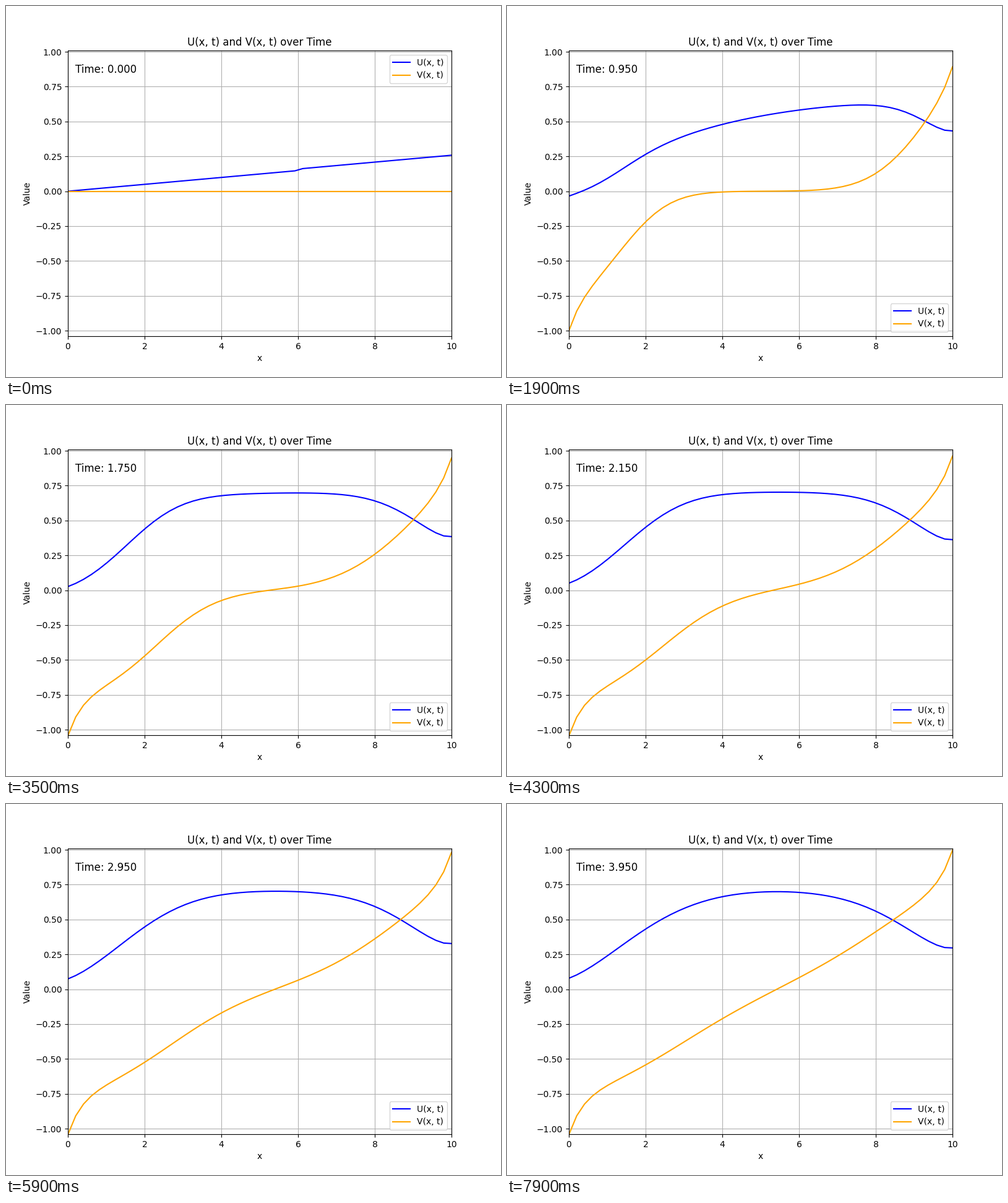
These frames come from a looping animation (800x600 px, 8 s). A matplotlib script:

```python
import matplotlib.pyplot as plt
import numpy as np
from matplotlib.animation import FuncAnimation

FRAMES, INTERVAL = 80, 100
FRAME_DT, SUBSTEPS = 0.05, 20
FLUX_LEFT, FLUX_RIGHT = 0.1 + 0.915j, 0.055 + 0.915j

x = np.linspace(0, 10, 50)
h = x[1] - x[0]


def step(psi, dt):
    """Advance psi = U + iV by psi_t = psi_xx + 2 psi - 4 |psi|^2 psi."""
    left = psi[1] - 2 * h * FLUX_LEFT
    right = psi[-2] + 2 * h * FLUX_RIGHT
    padded = np.concatenate(([left], psi, [right]))
    laplacian = np.diff(padded, 2) / h**2
    return psi + dt * (laplacian + 2 * psi - 4 * np.abs(psi)**2 * psi)


def solve():
    psi = 0.0247 * x + np.where(x > 6, 0.0112, 0) + 0j
    states = [psi]
    for _ in range(FRAMES - 1):
        for _ in range(SUBSTEPS):
            psi = step(psi, FRAME_DT / SUBSTEPS)
        states.append(psi)
    return states


states = solve()

fig, ax = plt.subplots(figsize=(8, 6), dpi=100)
u_line, = ax.plot(x, states[0].real, color="blue", label="U(x, t)")
v_line, = ax.plot(x, states[0].imag, color="orange", label="V(x, t)")
ax.set(xlim=(0, 10), ylim=(-1.0396, 1.0091), xlabel="x", ylabel="Value",
       title="U(x, t) and V(x, t) over Time")
ax.grid(True)
ax.legend(loc="best")
clock = ax.text(0.2, 0.85, "", fontsize=12)


def update(i):
    u_line.set_ydata(states[i].real)
    v_line.set_ydata(states[i].imag)
    clock.set_text(f"Time: {i * FRAME_DT:.3f}")
    return u_line, v_line, clock


anim = FuncAnimation(fig, update, frames=FRAMES, interval=INTERVAL,
                     repeat=True, repeat_delay=0)
plt.show()
```
